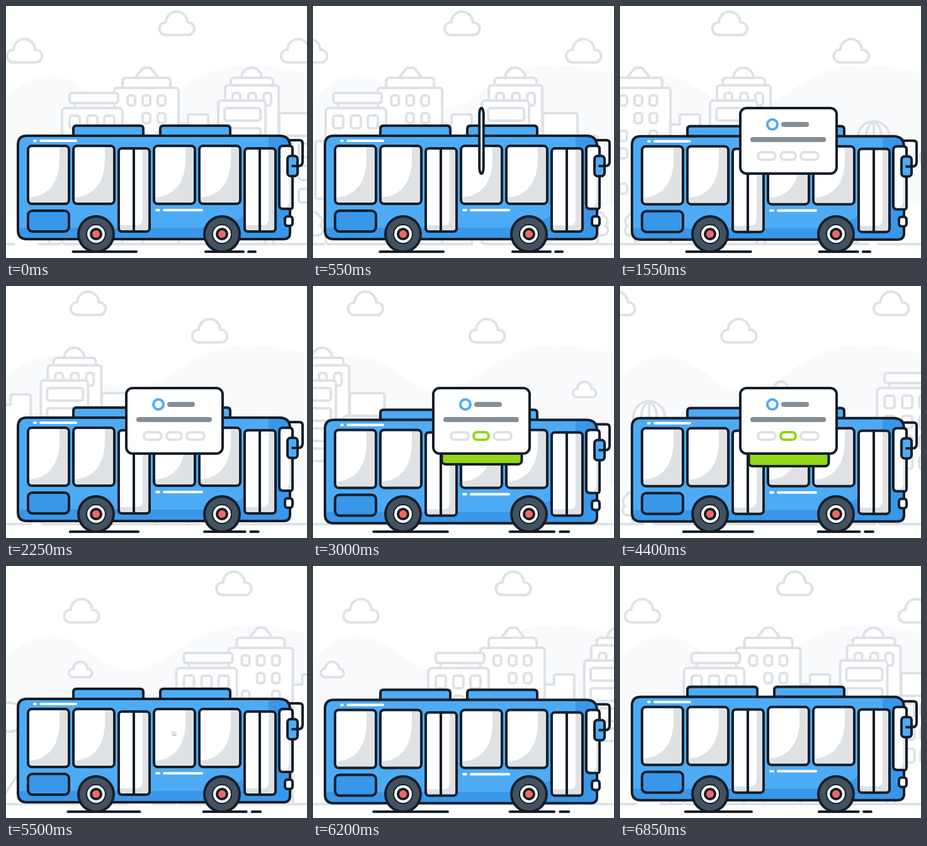
These frames come from a looping animation (478x400 px, 6900 ms). An HTML page:

```html
<!DOCTYPE html>
<html lang="en">
<head>
<meta charset="utf-8">
<title>City bus</title>
<style>
  html, body { margin: 0; width: 100%; height: 100%; overflow: hidden; background: #fff; }
  svg { display: block; width: 100vw; height: 100vh; }
  .pale { stroke: #dee2e6; stroke-width: 4; fill: #fff; }
  .open { fill: none; }
  .ink { stroke: #141e29; stroke-width: 4; }
  .sky { fill: #4dabf5; }
  .deep { fill: #3897e9; }
  .shade { fill: #dee2e5; }
</style>
</head>
<body>
<svg viewBox="0 0 478 400" stroke-linecap="round" stroke-linejoin="round">
  <path fill="#f8fafc" d="M0 148C25 122 45 110 70 110C120 110 150 165 195 165C260 165 290 94 380 94C420 94 450 100 478 107V318Q300 338 0 335Z"/>
  <g id="clouds" class="pale"></g>
  <g id="city" class="pale"></g>
  <g id="shadows" class="ink"></g>
  <g id="bus"></g>
  <g id="wheels"></g>
  <g id="popup">
    <rect id="strip" class="ink" x="204.5" width="127" height="60" rx="6" fill="#94d616"/>
    <rect id="card" class="ink" y="162" height="104" rx="10" fill="#fff"/>
    <g id="content" fill="none">
      <circle id="ring" cx="242" cy="188" r="8" stroke="#4dabf5" stroke-width="4"/>
      <path id="title" stroke="#868e96" stroke-width="8"/>
      <path id="text" stroke="#868e96" stroke-width="8"/>
      <g id="pills" stroke="#dee2e6" stroke-width="4"></g>
    </g>
  </g>
</svg>
<script>
const LOOP = 6900, STEP = 50;
const CITY_WIDTH = 870, CITY_SPEED = CITY_WIDTH / 6950;
const CLOUD_GAP = CITY_WIDTH / 2;
const BOB_PERIOD = 533.6, BOB_HEIGHT = 7.5;

const $ = id => document.getElementById(id);
const box = (x, y, right, bottom, r = 4, attrs = '') =>
  `<rect x="${x}" y="${y}" width="${right - x}" height="${bottom - y}" rx="${r}" ${attrs}/>`;
const path = (d, attrs = '') => `<path d="${d}" ${attrs}/>`;
const grid = (xs, ys, w, h) =>
  ys.map(y => xs.map(x => box(x, y, x + w, y + h)).join('')).join('');
const copies = (markup, gap, from, to) => {
  let out = '';
  for (let k = from; k <= to; k++) out += `<g transform="translate(${k * gap})">${markup}</g>`;
  return out;
};

function cloud(x, y, s = 1) {
  return path('M-18 37A10 10 0 0 1 -17 17A17 17 0 0 1 17 17A10 10 0 0 1 19 37Z',
    `transform="translate(${x} ${y}) scale(${s})" stroke-width="${4 / s}"`);
}

function tree(x) {
  return path(`M${x} 378V340M${x - 8} 364a8 8 0 0 1 -4 -15a9 9 0 0 1 1 -15a12 12 0 0 1 22 0a9 9 0 0 1 1 15a8 8 0 0 1 -4 15Z`);
}

function cityMarkup() {
  const tower = path('M205 114L217 99Q218 98 220 98H227Q229 98 230 99L242 114') +
    box(172, 130, 274, 378) + path('M185 130V120Q185 114 191 114H255Q261 114 261 120V130Z') +
    grid([193, 217, 241], [142], 12, 16) + grid([217, 241], [170], 12, 16) +
    grid([193, 241], [198], 12, 16) + grid([193], [226, 282], 12, 16);
  const flatRoof = box(73, 214, 100, 306) + path('M109 154V162M172 154V162') +
    box(89, 162, 185, 378, 6) + box(101, 138, 178, 154) +
    grid([101, 129, 156], [174, 206, 238, 270], 16, 20);
  const shed = path('M274 188H289V176Q289 172 293 172H317Q321 172 321 176V378H274Z');
  const domed = path('M374 114A16 16 0 0 1 406 114') +
    path('M357 126V120Q357 114 363 114H418Q424 114 424 120V126Z') +
    box(348, 126, 433, 378) + grid([360, 385, 409], [138], 12, 20) +
    box(337, 150, 412, 378, 5) + grid([347], [162, 194, 226, 258], 57, 20);
  const offices = box(434, 170, 489, 378) + box(424, 206, 521, 378) +
    grid([439, 465, 491], [218, 254, 290], 16, 22);
  const globe = path('M572 208A25 25 0 0 1 622 208V240H572Z') +
    path('M597 183V240M585 215C583 200 588 188 597 183C606 188 611 200 609 215', 'class="open"');
  const wheel = `<circle cx="694" cy="240" r="23"/>` + path('M706 333L676 378', 'class="open"');
  const ground = path('M-12 378H12M52 378H86M494 378H588M604 378H858', 'class="open"');
  return tower + flatRoof + shed + domed + offices + globe + wheel +
    [68, 218, 521, 571].map(tree).join('') + ground + cloud(806.5, 152, 0.66);
}

function busWindow(x) {
  return box(x, 222, x + 65, 314, 6, 'fill="#fff"') +
    path(`M${x + 50} 222V243C${x + 50} 280 ${x + 32} 303 ${x} 304V308Q${x} 314 ${x + 6} 314H${x + 59}Q${x + 65} 314 ${x + 65} 308V228Q${x + 65} 222 ${x + 59} 222Z`, 'class="shade"') +
    box(x, 222, x + 65, 314, 6, 'class="ink" fill="none"');
}

function busDoor(x) {
  return box(x, 226, x + 49, 358, 5, 'fill="#fff"') +
    path(`M${x + 38} 226V338Q${x + 38} 348 ${x + 28} 348H${x}V353Q${x} 358 ${x + 5} 358H${x + 44}Q${x + 49} 358 ${x + 49} 353V231Q${x + 49} 226 ${x + 44} 226Z`, 'class="shade"') +
    box(x, 226, x + 49, 358, 5, 'class="ink" fill="none"') +
    path(`M${x + 24} 226V358`, 'class="ink"');
}

function busMarkup() {
  const shell = 'M33 206H434Q451 206 451 223V360Q451 370 441 370H33Q19 370 19 356V220Q19 206 33 206Z';
  const roofUnit = x => path(`M${x} 206V195Q${x} 190 ${x + 5} 190H${x + 106}Q${x + 111} 190 ${x + 111} 195V206Z`, 'class="ink sky"');
  return path('M448 213H466Q471 213 471 218V247Q471 254 464 254H455', 'class="ink" fill="none"') +
    roofUnit(107) + roofUnit(245) +
    path(shell, 'class="sky"') +
    path('M417 206H434Q451 206 451 223V360Q451 370 441 370H33Q19 370 19 356V352H320C380 346 417 310 417 250Z', 'class="deep"') +
    path(shell, 'class="ink" fill="none"') +
    [35, 107, 235, 307].map(busWindow).join('') + busDoor(179) + busDoor(379) +
    box(35, 325, 100, 358, 7, 'class="ink deep"') +
    path('M45 214H47M55 214H111M239 324H243M251 324H311', 'stroke="#fff" stroke-width="4"') +
    path('M440 222H450Q455 222 455 227V318Q455 322 451 322H440Q434 322 434 316V228Q434 222 440 222Z', 'class="ink" fill="#fff"') +
    path('M450 272V310Q448 320 440 320H453V272Z', 'class="shade"') +
    box(447, 238, 463, 270, 5, 'class="ink sky"') + path('M455 254H463', 'class="ink"') +
    box(443, 334, 455, 349, 4, 'class="ink" fill="#fff"');
}

function wheelMarkup(x) {
  const disc = (r, fill) => `<circle cx="${x}" cy="362" r="${r}" fill="${fill}"/>`;
  return disc(30, '#141e29') + disc(26, '#43525f') + disc(16, '#141e29') +
    disc(14, '#fff') + disc(10, '#141e29') + disc(6, '#f06862');
}

$('clouds').innerHTML = copies(cloud(271, 9) + cloud(29, 52.5), CLOUD_GAP, -1, 2);
$('city').innerHTML = copies(cityMarkup(), CITY_WIDTH, -1, 1);
$('bus').innerHTML = busMarkup();
$('wheels').innerHTML = wheelMarkup(143) + wheelMarkup(343);
$('shadows').innerHTML = '<path/>';
$('pills').innerHTML = [[219, 247], [255, 279], [287, 315]]
  .map(([a, b]) => box(a, 232, b, 244, 6)).join('');
const pills = [...$('pills').children];

// Smooth 0..1 progress between two times.
function ease(t, start, end) {
  const p = Math.min(1, Math.max(0, (t - start) / (end - start)));
  return p * p * (3 - 2 * p);
}
const show = (el, on) => el.setAttribute('visibility', on ? 'inherit' : 'hidden');
const scaleAt = (el, x, y, s) =>
  el.setAttribute('transform', `translate(${x} ${y}) scale(${s}) translate(${-x} ${-y})`);

function bar(el, x, y, length, p) {
  el.setAttribute('d', `M${x} ${y}h${length * p}`);
  show(el, p > 0);
}

function drawPopup(t) {
  const open = ease(t, 500, 900), close = ease(t, 5150, 5550);
  show($('popup'), open > 0 && close < 1);
  scaleAt($('popup'), 267, 268, 1 - close);

  const width = 153 * open;
  $('card').setAttribute('x', 267.5 - width / 2);
  $('card').setAttribute('width', width);

  const slide = ease(t, 2700, 3100);
  $('strip').setAttribute('y', 206 + 20 * slide);
  show($('strip'), slide > 0);

  scaleAt($('ring'), 242, 188, ease(t, 850, 1050));
  bar($('title'), 260, 188, 36, ease(t, 950, 1200));
  bar($('text'), 211, 212, 112, ease(t, 1050, 1350));
  pills.forEach((pill, i) => {
    const [x, y] = [[233, 267, 301][i], 238];
    scaleAt(pill, x, y, ease(t, 1200 + i * 70, 1380 + i * 70));
  });
  pills[1].setAttribute('stroke', t >= 2400 ? '#94d616' : '#dee2e6');
}

function draw(t) {
  const scroll = t * CITY_SPEED;
  $('city').setAttribute('transform', `translate(${-scroll})`);
  $('clouds').setAttribute('transform', `translate(${-scroll / 2})`);

  const bob = (1 - Math.cos(t / BOB_PERIOD * 2 * Math.PI)) / 2;
  $('bus').setAttribute('transform', `translate(0 ${bob * BOB_HEIGHT})`);
  const at = (x, grow) => x + grow * bob;
  $('shadows').firstChild.setAttribute('d',
    `M${at(106.5, -12)} 390H${at(207, 8)}M${at(317, -5)} 390H${at(377, 7)}M${at(385, 8.5)} 390H${at(396, 12)}`);

  drawPopup(t);
}

const begin = performance.now();
function tick() {
  const t = (performance.now() - begin) % LOOP;
  draw(Math.floor(t / STEP) * STEP);
  requestAnimationFrame(tick);
}
tick();
</script>
</body>
</html>
```
